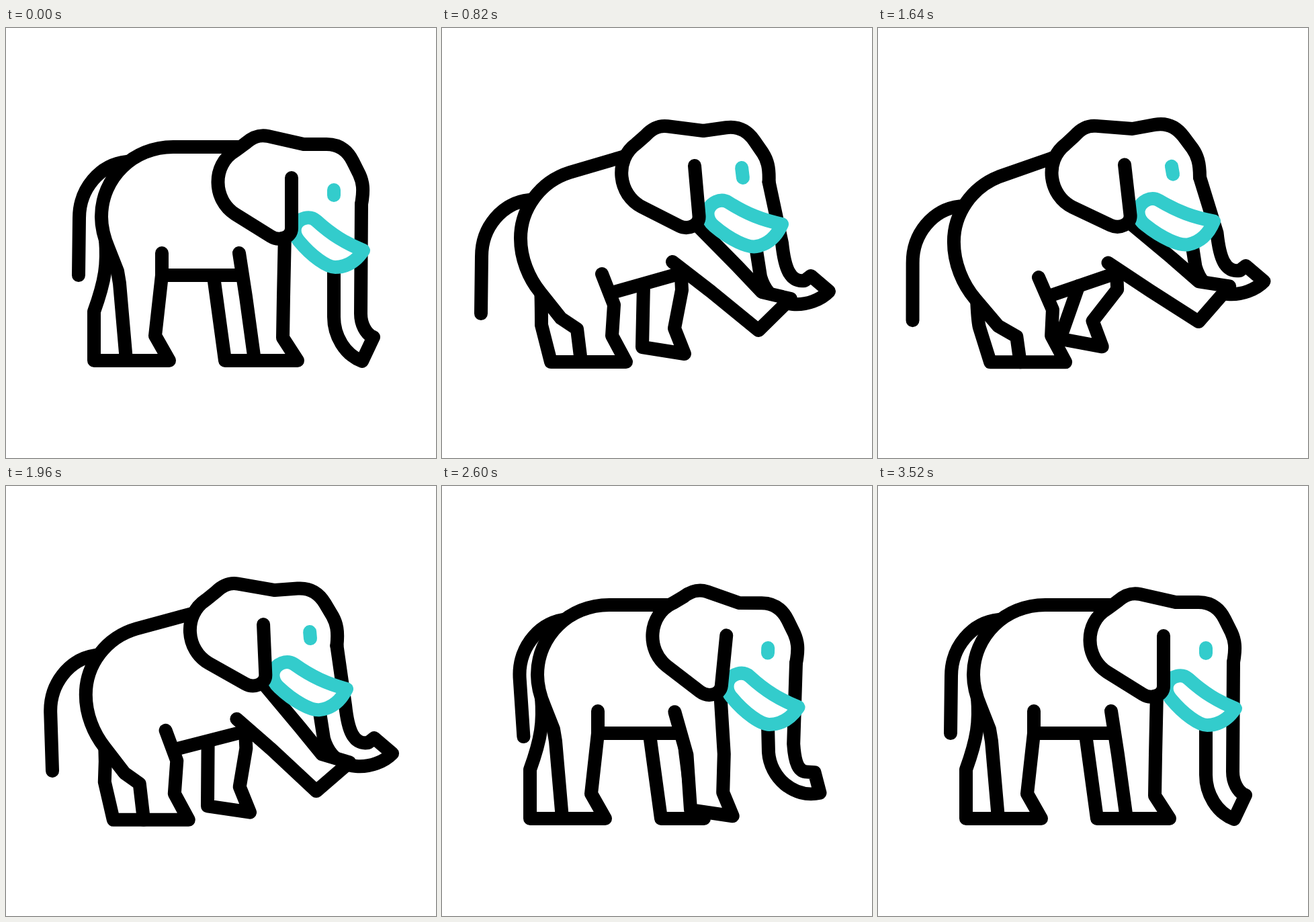
Write an HTML page that moves like this. It is 640 by 640 pixels and loops after 3.6 s.

```html
<!DOCTYPE html>
<html lang="en">
<head>
<meta charset="utf-8">
<title>Elephant</title>
<style>
  html, body { margin: 0; width: 100%; height: 100%; overflow: hidden; background: #fff; }
  svg { display: block; width: 100%; height: 100%; }
  path { fill: #fff; stroke: #000; stroke-width: 20; stroke-linecap: round; stroke-linejoin: round; }
  .line { fill: none; }
  .teal { stroke: #33cccc; }
</style>
</head>
<body>
<svg viewBox="0 0 640 640">
  <path id="tail" class="line"/>
  <path id="farHind"/>
  <path id="farFront"/>
  <path id="trunk"/>
  <path id="body"/>
  <path id="belly" class="line"/>
  <path id="nearFront"/>
  <path id="tusk" class="teal"/>
  <path id="head"/>
  <path id="eye" class="line teal"/>
</svg>
<script>
const LOOP = 3600;
const mix = (a, b, k) => a.map((v, i) => v + (b[i] - v) * k);
const shift = (pts, x, y) => pts.map((v, i) => v + (i % 2 ? y : x));

// Poses: standing, rearing, high, lowering, landing; then optional head swing and its peak.
function track(stand, rear, high, lower, land, swing, peak) {
  const keys = [
    [100, stand], [640, mix(stand, rear, 0.96)], [820, rear], [1300, high],
    [1640, mix(rear, high, 1.5)], [1960, lower], [2320, land]
  ];
  if (swing) keys.push([2900, swing], [3060, peak]);
  else keys.push([2460, stand]);
  keys.push([3520, stand]);
  return keys;
}
const level = (...values) => track(...values.map(v => [v]));

// Monotone cubic interpolation, at rest at both ends.
function slope(keys, k, i) {
  if (k === 0 || k === keys.length - 1) return 0;
  const [[t0, a], [t1, b], [t2, c]] = keys.slice(k - 1, k + 2);
  const l = (b[i] - a[i]) / (t1 - t0), r = (c[i] - b[i]) / (t2 - t1);
  return l * r > 0 ? 2 * l * r / (l + r) : 0;
}
function sample(keys, t) {
  if (t <= keys[0][0]) return keys[0][1];
  const k = keys.findIndex(key => key[0] > t) - 1;
  if (k < 0) return keys[keys.length - 1][1];
  const [t0, a] = keys[k], [t1, b] = keys[k + 1];
  const d = t1 - t0, u = (t - t0) / d, v = 1 - u;
  return a.map((p, i) =>
    v * v * (1 + 2 * u) * p + u * u * (3 - 2 * u) * b[i] +
    d * u * v * (v * slope(keys, k, i) - u * slope(keys, k + 1, i)));
}

// Rotate, scale and move a flat list of x, y pairs.
function place(pts, x, y, deg, size = 1) {
  const c = Math.cos(deg * Math.PI / 180) * size, s = Math.sin(deg * Math.PI / 180) * size;
  return pts.map((v, i) => i % 2 ? y + pts[i - 1] * s + v * c : x + v * c - pts[i + 1] * s);
}
function draw(id, ops, pts) {
  let i = 0, d = '';
  for (const op of ops) {
    const n = op === 'C' ? 6 : op === 'Z' ? 0 : 2;
    d += op + pts.slice(i, i + n).map(v => v.toFixed(2)).join(' ');
    i += n;
  }
  document.getElementById(id).setAttribute('d', d);
}

// Rigid outlines
const TAIL = [0,0, -40,4, -71,40, -71,84, -72,169];
const TUSK = [0,0, -27,-11, -47,-23, -70,-44, -80,-53, -96,-48, -101,-37,
  -104,-29, -102,-21, -96,-14, -77,9, -54,25, -42,25, -24,25, -10,15, 0,0];
const EAR = [0,0, 0,75, 0,89, -18,95, -31,87, -84,54, -117,33, -119,-19, -84,-40,
  -69,-51, -59,-60, -49,-65, -35,-62];
const BROW = [0,0, 34,0, 52,0, 65,9, 73,25, 83,45, 88,56, 90,67, 86,89];
const EYE = [0,-1, 0,1];

// x, y, angle of each rigid part (size or half length last)
const tuskAt = track([532,331,0,1], [506,292,-10,1.04], [502,289,-11,1.05],
  [507,302,-7,1.04], [519,347,8.5,1.04], [542,302,-13,1.03], [546,296,-16,1.03]);
const earAt = track([425,223,0], [376,205,-5], [370,204,-6], [383,206,-2.5],
  [428,223,8.5], [415,221,2.5], [412,220,3]);
const browAt = track([443,173,0], [389,153,-8], [382,151,-9.5], [400,155,-4.2],
  [454,177,7.3], [420,168,-10.8], [411,165,-14.5]);
const eyeAt = track([488,245,0,4], [447,215.5,-7,7.5], [441,213,-9,6.5], [452.5,222,-5,5],
  [488,254.5,10,4.6], [479.5,228.5,-11,2.6], [476.5,223,-14,2.2]);

// Bending outlines, standing and rearing
const BODY_DOWN = [345,177, 249,177, 189,177, 142,223, 142,281, 142,298, 147,315, 153,329,
  166,362, 169,380, 179,495, 243,495, 222,458, 232,368, 232,335];
const BODY_UP = [275,190, 190,215, 146,229, 117,269, 117,313, 117,343, 129,372, 146,393,
  177,432, 201,448, 207,497, 274,497, 253,458, 256,412, 238,366];
const HIND_DOWN = [148,315, 151,350, 148,375, 131,422, 131,495, 180,495];
const HIND_UP = [147,385, 148,405, 148,425, 148,442, 162,497, 207,497];
const FAR_DOWN = [309,370, 326,495, 390,495, 370,458, 362,395, 360,372];
const FAR_UP = [300,382, 298,475, 361,485, 346,447, 357,390, 356,370];
const NEAR_DOWN = [347,335, 357,400, 370,495, 434,495, 412,461, 413,400, 415,305];
const NEAR_UP = [343,348, 400,392, 471,450, 519,403, 476,393, 440,355, 384,298];
const NEAR_STEP = [346,337, 369,400, 370,474, 432,489, 422,453, 424,398, 414,315];

// How far the body rears, the front leg reaches and steps, the far leg kicks
const rearing = level(0, 1, 1.11, 0.93, 0.18);
const reaching = level(0, 1, 1.08, 0.91, 0, 0, 0);
const stepping = level(0, 0, 0, 0, 1, 0.15, 0.12);
const kicking = level(0, 0, 1, 0, 0);
const wagging = level(0, 0, -0.4, -2.5, -8.3, 2.3, 5);

const TRUNK_DOWN = [528,425, 528,442, 536,454, 544,459, 547,460, 530,496,
  504,486, 488,458, 488,430, 488,355];
const TRUNK_UP = [506,320, 510,358, 518,379, 540,376, 549,369, 576,392,
  552,417, 490,425, 474,370, 467,325];
const TRUNK_CURL = [505,400, 503,428, 510,438, 521,438, 532,439, 544,469,
  505,481, 465,452, 466,408, 469,365];
const TRUNK_SWING = [548,355, 556,388, 560,403, 574,403, 588,403, 594,434,
  552,441, 522,402, 514,375, 504,335];
const trunkAt = track(TRUNK_DOWN, TRUNK_UP, shift(TRUNK_UP, -1, -10), shift(TRUNK_UP, -1, 6),
  TRUNK_CURL, TRUNK_SWING, mix(TRUNK_DOWN, TRUNK_SWING, 1.17));

function render(t) {
  const [rear] = sample(rearing, t), [reach] = sample(reaching, t);
  const [step] = sample(stepping, t), [kick] = sample(kicking, t);
  const [wag] = sample(wagging, t);

  draw('tail', 'MCL', place(TAIL, ...mix([180, 199], [130, 256], rear), wag));
  draw('farHind', 'MCLL', mix(HIND_DOWN, HIND_UP, rear));
  draw('body', 'MLCCLLLLLLL', mix(BODY_DOWN, BODY_UP, rear));
  draw('belly', 'ML', mix([232, 368, 353, 368], [256, 393, 352, 366], rear));

  const far = mix(FAR_DOWN, FAR_UP, rear), kicked = shift(far, -15 * kick, -6 * kick);
  draw('farFront', 'MLLLLL', far.map((v, i) => i > 1 && i < 8 ? kicked[i] : v));

  const lift = mix(NEAR_DOWN, NEAR_STEP, step);
  const near = mix(NEAR_DOWN, NEAR_UP, reach).map((v, i) => v + lift[i] - NEAR_DOWN[i]);
  const raised = shift(near, -4 * kick, -5 * kick);
  draw('nearFront', 'MLLLLLL', near.map((v, i) => i > 3 ? raised[i] : v));

  const brow = place(BROW, ...sample(browAt, t));
  draw('trunk', 'MLCLLCL', [...brow.slice(-2), ...sample(trunkAt, t)]);
  draw('tusk', 'MCCCCCZ', place(TUSK, ...sample(tuskAt, t)));
  draw('head', 'MLCLCLCLLCLC', [...place(EAR, ...sample(earAt, t)), ...brow]);
  draw('eye', 'ML', place(EYE, ...sample(eyeAt, t)));
}

const start = performance.now();
function tick() {
  render((performance.now() - start) % LOOP);
  requestAnimationFrame(tick);
}
tick();
</script>
</body>
</html>
```
